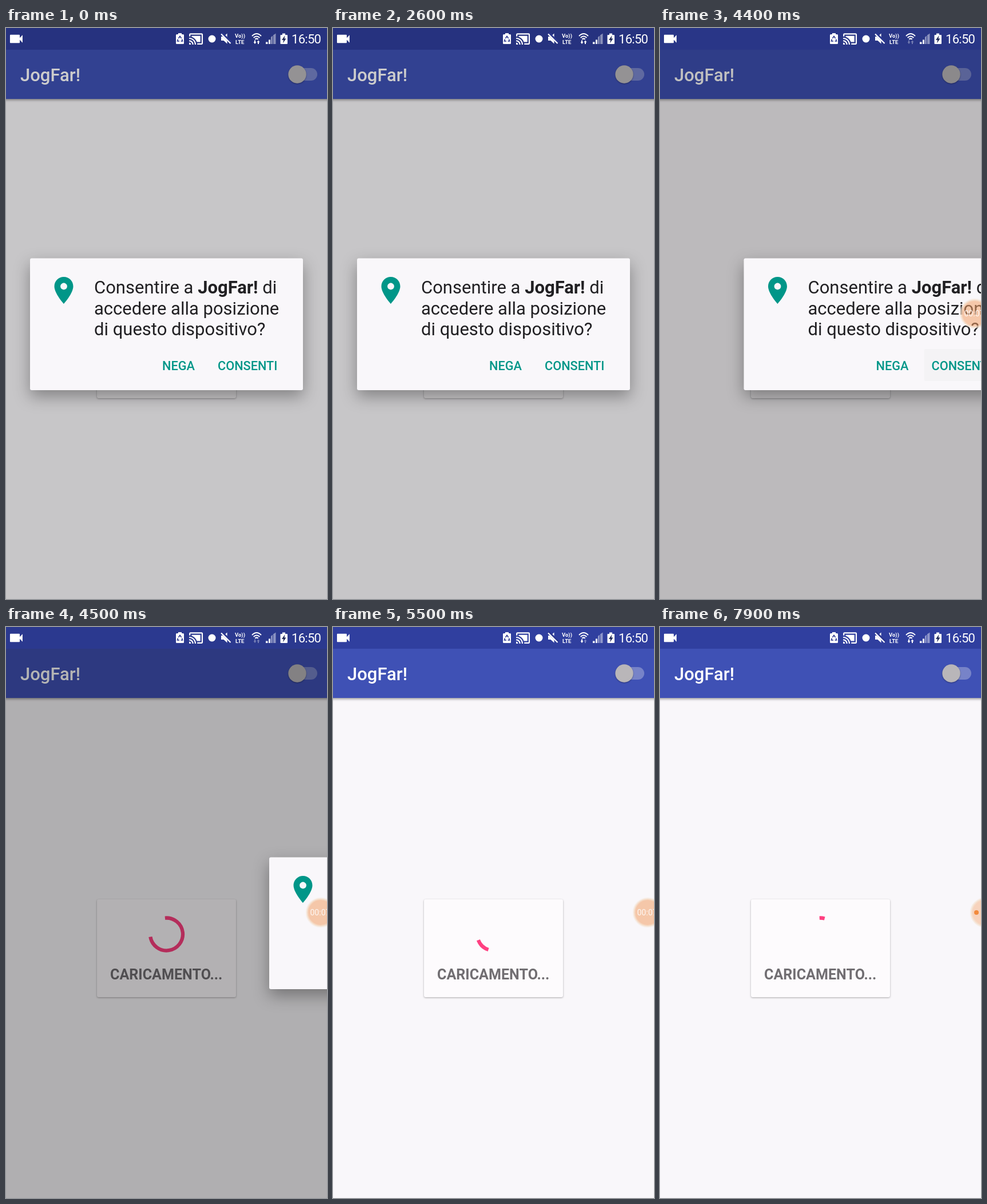
An HTML page for the animation above (8 s loop, 561x998 px).

```html
<!DOCTYPE html>
<html lang="it">
<head>
<meta charset="utf-8">
<title>JogFar!</title>
<style>
  html, body { margin: 0; width: 100%; height: 100%; overflow: hidden; background: #f9f7fa; }
  svg { display: block; width: 561px; height: 998px; }
  text { font-family: Roboto, "Noto Sans", sans-serif; }
  .title { font-size: 31px; font-weight: 500; fill: #fff; }
  .question { font-size: 31px; fill: #212023; }
  .button { font-size: 21.7px; font-weight: 500; fill: #009688; }
  .loading { font-size: 25.1px; font-weight: 700; fill: #716e72; }
  .clock { font-size: 22px; letter-spacing: -.7px; fill: #fff; }
  .volte { font-size: 9.5px; font-weight: 700; fill: #fff; }
  .timer { font-size: 14px; fill: #fff; fill-opacity: .85; }
  .bar { filter: drop-shadow(0 2px 2px rgba(0,0,0,.38)); }
  .card { filter: drop-shadow(0 1.5px 1.5px rgba(0,0,0,.32)); }
  .thumb { filter: drop-shadow(0 1px 1px rgba(0,0,0,.35)); }
  .sheet { filter: drop-shadow(0 11px 14px rgba(0,0,0,.34)); }
</style>
</head>
<body>
<svg viewBox="0 0 561 998">
  <!-- app -->
  <rect width="561" height="998" fill="#f9f7fa"/>
  <rect class="bar" x="-10" y="30" width="581" height="94" fill="#3f51b5"/>
  <text class="title" x="25" y="93">JogFar!</text>
  <rect x="498" y="70" width="46" height="22" rx="11" fill="#7783c8"/>
  <circle class="thumb" cx="509" cy="81" r="15.7" fill="#b9b6b9"/>
  <rect class="card" x="159" y="476" width="243" height="171" rx="3" fill="#fdfbfd"/>
  <path id="spinner" fill="none" stroke="#ff4081" stroke-width="6.3"/>
  <text class="loading" x="182" y="616">CARICAMENTO...</text>
  <rect id="dim" y="38" width="561" height="960"/>

  <!-- status bar -->
  <rect width="561" height="38" fill="#303f9f"/>
  <rect id="statusDim" width="561" height="38"/>
  <g fill="#fff">
    <path transform="translate(3.3 4.4) scale(1.22)" d="M17 10.5V7c0-.55-.45-1-1-1H4c-.55 0-1 .45-1 1v10c0 .55.45 1 1 1h12c.55 0 1-.45 1-1v-3.5l4 4v-11l-4 4z"/>
    <path d="M301 11V9h6v2h2.5q1.5 0 1.5 1.5v14q0 1.5-1.5 1.5h-11q-1.5 0-1.5-1.5v-14q0-1.5 1.5-1.5z"/>
    <path d="M301.5 18l2.5-3.5 2.5 3.5M307.5 19.5l1 3.5h-3M303 23h-3.5l1-3.5" fill="none" stroke="#2b378f" stroke-width="1.6"/>
    <path transform="translate(319 6) scale(1.09)" d="M21 3H3c-1.1 0-2 .9-2 2v3h2V5h18v14h-7v2h7c1.1 0 2-.9 2-2V5c0-1.1-.9-2-2-2zM1 18v3h3c0-1.66-1.34-3-3-3zm0-4v2c2.76 0 5 2.24 5 5h2c0-3.87-3.13-7-7-7zm0-4v2c4.97 0 9 4.03 9 9h2c0-6.08-4.93-11-11-11zM19 7H5v1.63c3.96 1.28 7.09 4.41 8.37 8.37H19z"/>
    <circle cx="360" cy="19" r="6.5"/>
    <path d="M376 15h4.5l6-5.5v18l-6-5.5H376z"/>
    <path d="M376.5 9l17 17" stroke="#2b378f" stroke-width="5"/>
    <path d="M376 10.5l16.5 16.5" stroke="#fff" stroke-width="2.2"/>
    <text class="volte" x="400" y="17">Vo))</text>
    <text class="volte" x="401" y="27.5">LTE</text>
    <path d="M430 14q8-8 16 0M432.7 17q5.3-5 10.6 0M435.3 19.8q2.7-2.3 5.4 0" fill="none" stroke="#fff" stroke-width="2"/>
    <path id="arrowDown" d="M434 21.5h2v3h1.5l-2.5 3.5-2.5-3.5h1.5z"/>
    <path id="arrowUp" d="M440 28h2v-3h1.5l-2.5-3.5-2.5 3.5h1.5z"/>
    <path d="M454 28v-3.5h3.5V28zM459 28v-7.5h3V28z"/>
    <path d="M463 28V16l3-2.5V28zM467 28V12.5l4.5-3V28z" opacity=".45"/>
    <path d="M483 12V9.5h5V12h3q1 0 1 1v14q0 1-1 1h-10.5q-1 0-1-1V13q0-1 1-1z"/>
    <path d="M487.5 13l-5.5 8h3l-1 5.5 5.5-8h-3z" fill="#202858"/>
    <text class="clock" x="499" y="27">16:50</text>
  </g>

  <!-- permission dialog -->
  <g id="dialog">
    <rect class="sheet" x="42" y="402.5" width="477" height="230.5" rx="3" fill="#f9f7fa"/>
    <path transform="translate(72.7 430.3) scale(2.357)" fill="#009688" fill-rule="evenodd"
      d="M12 2C8.13 2 5 5.13 5 9c0 5.25 7 13 7 13s7-7.75 7-13c0-3.87-3.13-7-7-7zM12 6.5a2.5 2.5 0 1 0 .01 0z"/>
    <text class="question" x="154" y="464">Consentire a <tspan font-weight="700">JogFar!</tspan> di</text>
    <text class="question" x="154" y="501">accedere alla posizione</text>
    <text class="question" x="154" y="537">di questo dispositivo?</text>
    <rect id="press" x="357" y="561" width="130" height="56" rx="3" fill="#f4f3f5"/>
    <text class="button" x="273" y="598">NEGA</text>
    <text class="button" x="370" y="598">CONSENTI</text>
  </g>

  <!-- floating recorder -->
  <g id="bubble">
    <circle id="disc" r="24" fill="#f3a066" stroke="#f5e6d6" stroke-opacity=".6" stroke-width="4"/>
    <text id="timer" class="timer" x="-18.5" y="5">00:07</text>
    <circle id="dot" cx="-15" r="4" fill="#f28a3c"/>
  </g>
</svg>
<script>
  const LOOP = 8000, STEP = 100;
  const SPIN = { cx: 280.5, cy: 537, r: 28.5, cycle: 1333, origin: 4030, cap: 6 };
  const el = Object.fromEntries([...document.querySelectorAll('[id]')].map(e => [e.id, e]));
  const set = (e, name, value) => e.setAttribute(name, value);
  const show = (e, on) => set(e, 'visibility', on ? 'inherit' : 'hidden');
  const progress = (t, from, to) => Math.min(1, Math.max(0, (t - from) / (to - from)));
  const smooth = u => u * u * (3 - 2 * u);

  function track(t, keys) {
    let value = keys[0][1];
    for (let i = 1; i < keys.length; i++) {
      value += (keys[i][1] - keys[i - 1][1]) * progress(t, keys[i - 1][0], keys[i][0]);
    }
    return value;
  }

  // Bezier timing with y control points 0 and 1, solved for x by bisection.
  function ease(x, x0, x1, x2, x3) {
    if (x <= x0) return 0;
    if (x >= x3) return 1;
    let lo = 0, hi = 1;
    for (let i = 0; i < 24; i++) {
      const u = (lo + hi) / 2, v = 1 - u;
      const bx = x0 * v ** 3 + 3 * x1 * u * v * v + 3 * x2 * u * u * v + x3 * u ** 3;
      if (bx < x) lo = u; else hi = u;
    }
    return smooth(lo);
  }

  function ringPoint(deg) {
    const a = deg * Math.PI / 180;
    return `${SPIN.cx + SPIN.r * Math.sin(a)} ${SPIN.cy - SPIN.r * Math.cos(a)}`;
  }

  function spinnerPath(t) {
    const p = (((t - SPIN.origin) / SPIN.cycle) % 1 + 1) % 1;
    const tail = 270 * ease(p, .5, .7, .6, 1);
    const head = 270 * ease(p, 0, .2, .1, .5);
    const turn = 90 * p + .226 * t + 32;
    const from = turn + tail - SPIN.cap, to = turn + head + SPIN.cap;
    return `M${ringPoint(from)}A${SPIN.r} ${SPIN.r} 0 ${+(to - from > 180)} 1 ${ringPoint(to)}`;
  }

  function render(t) {
    set(el.spinner, 'd', spinnerPath(t));
    set(el.dim, 'opacity', track(t, [[4300, .2], [4500, .295], [4600, .065], [4700, .01], [4800, 0]]));
    set(el.statusDim, 'opacity', track(t, [[4300, .2], [4500, .1], [4600, .04], [4700, 0]]));

    const slide = Math.max(0, (t - 4300) / 200);
    set(el.dialog, 'transform', `translate(${418 * slide * slide} 0)`);
    show(el.dialog, t < 4600);
    show(el.press, t >= 4200);

    const dock = smooth(progress(t, 6000, 6200));
    set(el.bubble, 'transform', `translate(${550 + 18 * dock} 499)`);
    set(el.disc, 'fill-opacity', .54 - .12 * dock);
    show(el.bubble, t >= 4100);
    show(el.timer, t >= 4100 && dock < .5);
    show(el.dot, dock >= .5);

    const idle = t >= 3800 && t < 5500;
    set(el.arrowDown, 'opacity', idle ? .35 : 1);
    set(el.arrowUp, 'opacity', idle || (t >= 5500 && t < 7000) ? .35 : 1);
  }

  const start = performance.now();
  function frame() {
    const t = (performance.now() - start) % LOOP;
    render(Math.floor(t / STEP) * STEP);
    requestAnimationFrame(frame);
  }
  frame();
</script>
</body>
</html>
```
